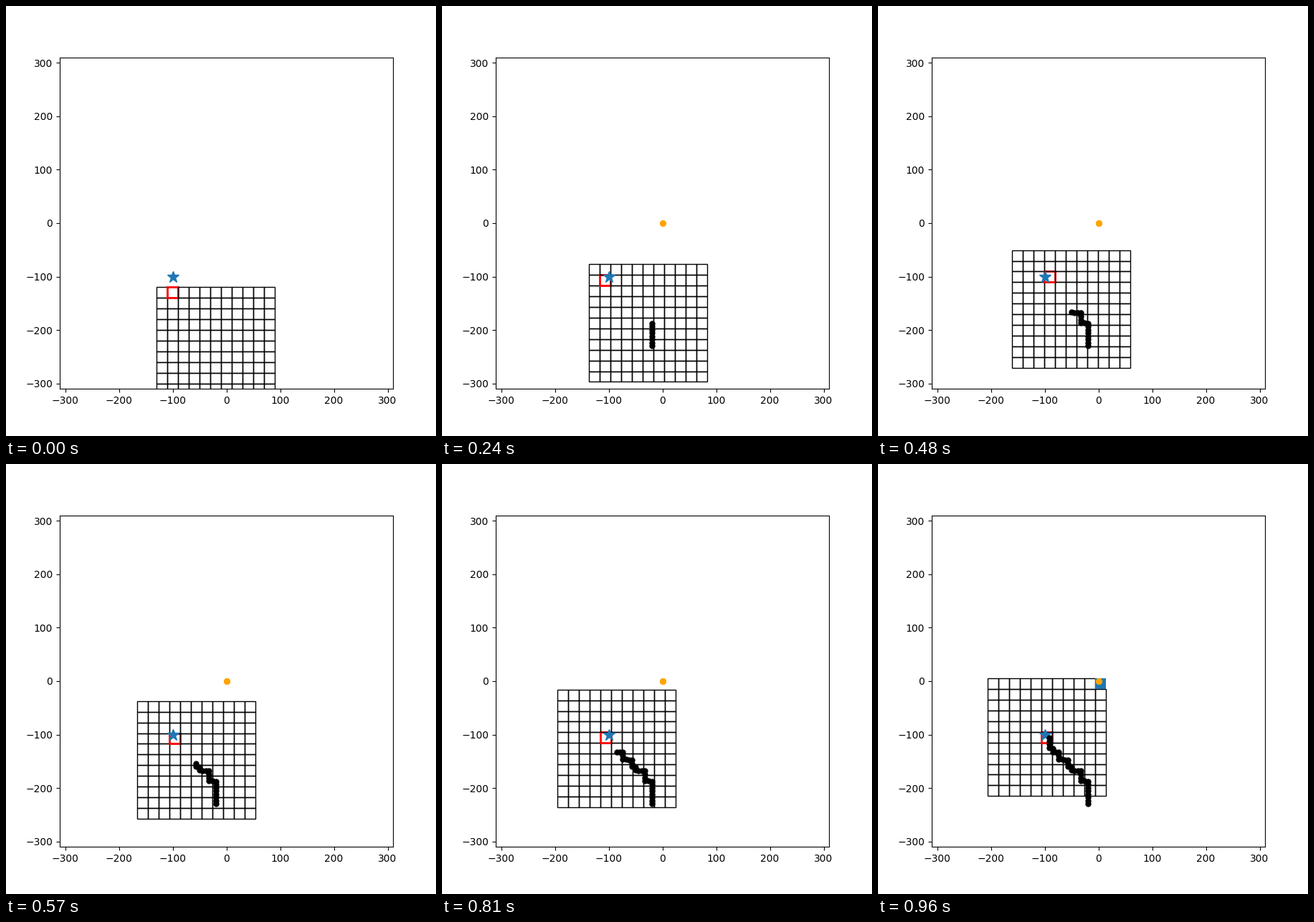
A matplotlib script for the animation above (0.99 s loop, 600 by 600 pixels).

```python
import numpy as np
import matplotlib.pyplot as plt
from matplotlib.animation import FuncAnimation
from matplotlib.patches import Rectangle

FRAMES = 33
INTERVAL = 30
CELLS = 11
CELL = 20
HALF = CELLS * CELL / 2
START = np.array([-20, -230])
GOAL = np.array([-100, -100])
OBSTACLE = np.array([0, 0])

# Lengths of the runs, going up and left by turns
RUNS = [7, 2, 3, 3, 1, 1, 2, 3, 2, 2, 1, 1, 3, 1]


def walk():
    """Positions over one loop; steps up grow while steps left shrink."""
    left = np.repeat(np.arange(len(RUNS)) % 2, RUNS)
    k = np.arange(1, FRAMES)
    dx = np.where(left, 0.025 * k - 6.36, 0)
    dy = np.where(left, 0.4, 5.98 + 0.022 * k)
    return START + np.cumsum([(0, 0), *zip(dx, dy)], axis=0)


path = walk()

fig, ax = plt.subplots(figsize=(6, 6), dpi=100)
ax.set_xlim(-310, 310)
ax.set_ylim(-310, 310)

# Columns left to right, each from the bottom up
cells = {
    (i, j): ax.add_patch(Rectangle((0, 0), CELL, CELL))
    for i in range(CELLS) for j in range(CELLS)
}
ax.plot(*GOAL, "*", color="C0", ms=12)
trail, = ax.plot([], [], "ko", ms=5)
obstacle, = ax.plot([], [], "o", color="orange", ms=5)


def cell_at(point, corner):
    return np.floor((point - corner) / CELL).astype(int)


def style(cell, edge, width, fill=False):
    cell.set_fill(fill)
    cell.set_facecolor("C0")
    cell.set_edgecolor(edge)
    cell.set_linewidth(width)


def update(k):
    corner = path[k] - HALF
    nearest = tuple(np.clip(cell_at(GOAL, corner), 0, CELLS - 1))
    occupied = tuple(cell_at(OBSTACLE, corner))
    for key, cell in cells.items():
        cell.set_xy(corner + np.array(key) * CELL)
        if key == occupied:
            style(cell, "none", 0, fill=True)
        elif key == nearest:
            style(cell, "red", 2)
        else:
            style(cell, "black", 1)
    # The obstacle is marked again at every step
    obstacle.set_data([OBSTACLE[0]] * k, [OBSTACLE[1]] * k)
    trail.set_data(path[:k, 0], path[:k, 1])
    return [*cells.values(), obstacle, trail]


anim = FuncAnimation(fig, update, frames=FRAMES, init_func=lambda: update(0),
                     interval=INTERVAL, repeat=True, repeat_delay=0)
plt.show()
```
